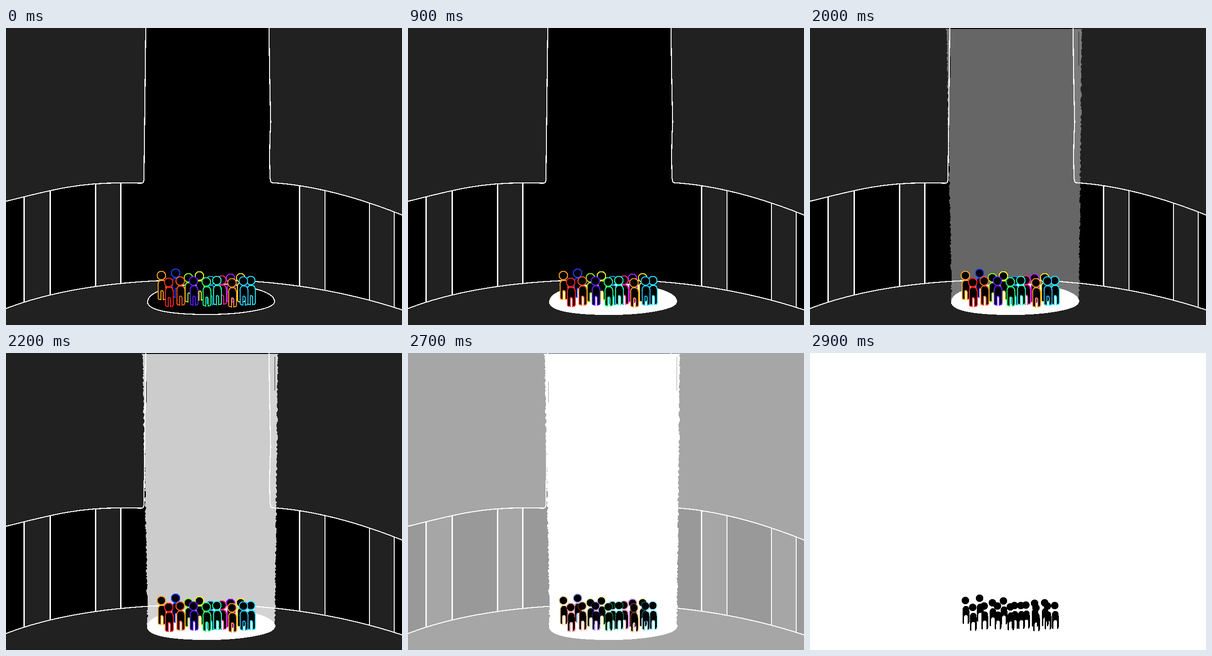
These frames come from a looping animation (864 by 648 pixels, 6.9 s). An HTML page:

```html
<!DOCTYPE html>
<html lang="en">
<head>
<meta charset="utf-8">
<title>Beam</title>
<style>
html, body { margin: 0; width: 100%; height: 100%; overflow: hidden; background: #000; }
svg { display: block; width: 100%; height: 100%; shape-rendering: crispEdges; }
.line { stroke: #fff; stroke-width: 2.2; stroke-linejoin: round; }
.person { fill: #000; stroke-width: 2.2; }
</style>
</head>
<body>
<svg id="stage" viewBox="0 0 864 648">
  <rect width="864" height="648"/>
  <g id="pillars"></g>
  <g class="line" fill="#212121">
    <path d="M305 -5C304 130 303 230 301 330Q300.5 338.5 296 338.5L250 338C150 338 90 356 0 378L-5 379V-5Z"/>
    <path d="M574 -5Q574.5 90 577.5 205Q574 270 576 322Q576.5 337.5 580 337.5C670 343 770 370 864 408L869 410V-5Z"/>
    <path d="M-5 614L0 612C130 562 290 549 432 549C590 549 730 571 864 615L869 617V653H-5Z"/>
  </g>
  <path id="platform" class="line" d="M309 598C309 572 375 558 447 558C510 558 586 572 586 597C586 614 510 625 440 625C370 625 309 618 309 598Z"/>
  <use id="glow" href="#platform" fill="#fff"/>
  <path id="beam" fill="#fff" fill-rule="evenodd"/>
  <g id="crowd"></g>
  <g id="flash">
    <rect width="864" height="648" fill="#fff"/>
    <g id="shadows"></g>
  </g>
</svg>
<script>
const LOOP = 6900, STEP = 100, STEPS = 5;
const layer = id => document.getElementById(id);

// Pillars run full height; the panels and the floor cover their ends.
layer('pillars').innerHTML = [[39.5, 96.5], [195.5, 250.5], [640.5, 696], [793, 847]]
  .map(([left, right]) =>
    `<rect class="line" x="${left}" width="${right - left}" y="300" height="330" fill="#212121"/>`)
  .join('');

// Light beam: two slightly converging sides with a seeded ragged edge, and two thin slits.
function beamPath() {
  const top = 2, bottom = 600, left = [], right = [];
  let seed = 7;
  const jitter = () => (seed = seed * 16807 % 2147483647) / 2147483647 * 3.6 - 1.8;
  for (let y = top; y <= bottom; y += 3) {
    const k = y / bottom;
    left.push(`${298 + 11 * k + jitter()} ${y}`);
    right.unshift(`${593 - 6 * k + jitter()} ${y}`);
  }
  return `M${left.join('L')}L${right.join('L')}Z` +
    'M586 8h1v74h-1zM305.5 62h1.2v46h-1.2z';
}
layer('beam').setAttribute('d', beamPath());

// Back to front: head x, head y, hue. Everyone shares the same build.
const people = [
  [370, 535, 231], [446, 551, 209], [471, 550, 330], [490, 546, 278],
  [512, 545, 54], [398, 545, 90], [422, 541, 61], [339, 540, 36],
  [355, 555, 0], [380, 552, 16], [437, 554, 144], [460, 551, 167],
  [409, 552, 256], [493, 556, 31], [534, 551, 186], [518, 552, 195]
];

// Round head over an arched body with two legs; inset shrinks the shape inside its outline.
function personPath(x, y, inset) {
  const r = 9.4 - inset, w = 8.6 - inset, gap = 2.6 + inset;
  const cx = x + 1.2, top = y + 10.5 + inset, foot = y + 52.5 - inset, crotch = y + 33 - inset;
  const leg = side =>
    `Q${cx + side * w} ${foot} ${cx + side * gap} ${foot}`;
  return `M${x - r} ${y}a${r} ${r} 0 1 0 ${2 * r} 0a${r} ${r} 0 1 0 ${-2 * r} 0Z` +
    `M${cx - w} ${top + 10}Q${cx - w} ${top} ${cx} ${top}Q${cx + w} ${top} ${cx + w} ${top + 10}` +
    `V${foot - 4}${leg(1)}V${crotch + 5}Q${cx + gap} ${crotch} ${cx} ${crotch}` +
    `Q${cx - gap} ${crotch} ${cx - gap} ${crotch + 5}V${foot}` +
    `Q${cx - w} ${foot} ${cx - w} ${foot - 4}Z`;
}
const drawPeople = (inset, stroke) => people.map(([x, y, hue]) =>
  `<path class="person" d="${personPath(x, y, inset)}" stroke="${stroke(hue)}"/>`).join('');

layer('crowd').innerHTML = drawPeople(0, hue => `hsl(${hue} 100% 56%)`);
layer('shadows').innerHTML = drawPeople(1.3, () => 'none');

const fades = [['glow', 500], ['beam', 1900], ['flash', 2500]];

// Each layer appears in equal steps and stays until the loop restarts.
function draw(time) {
  for (const [id, start] of fades) {
    const step = Math.floor((time - start) / STEP) + 1;
    layer(id).setAttribute('opacity', Math.min(STEPS, Math.max(0, step)) / STEPS);
  }
}

const begin = performance.now();
function tick() {
  draw((performance.now() - begin) % LOOP);
  requestAnimationFrame(tick);
}
// The platform outline keeps a dark fill of its own below the glow.
layer('glow').outerHTML = layer('platform').outerHTML
  .replace('id="platform"', 'id="glow" fill="#fff"');
tick();
</script>
</body>
</html>
```
